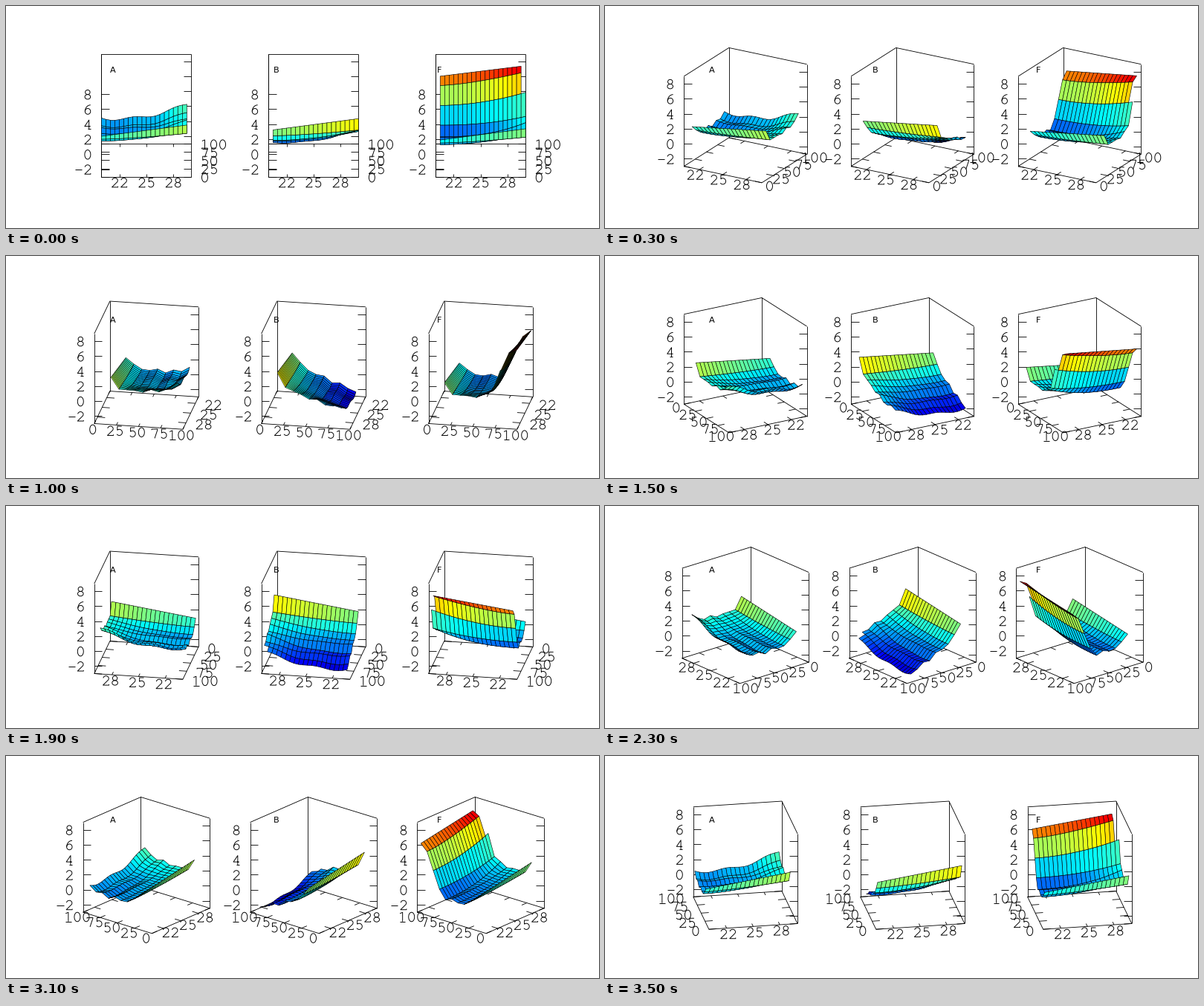
Recreate the animation shown at these times as a matplotlib script. Size 798 by 300 pixels, loop 3600 ms.

```python
import numpy as np
import matplotlib.pyplot as plt
from matplotlib.animation import FuncAnimation
from matplotlib.collections import LineCollection, PolyCollection

W, H, DPI = 798, 300, 100
FRAMES, INTERVAL = 36, 100
SIDE, CY = 121.0, 207.9          # box side and height of the base centre, px
ZPX, ZMIN, ZMAX = 10.13, -3, 9   # px per z unit and z range
SIN = 0.368                      # sine of the elevation
COS = np.sqrt(1 - SIN ** 2)
CMIN, CMAX = -3.0, 8.0
TICK, CHAR, LINE = 10.5, 12.05, 19
PX = 72 / DPI
CORNERS = np.array([(-.5, -.5), (.5, -.5), (.5, .5), (-.5, .5)])


def heights(u, k, trend, sag):
    """Height at u in 0..1 along x on row k, shared by all panels."""
    wave = np.cos(.8 * np.pi * k)
    start = .15 + 1.7 * np.exp(-1.3 * k) - .25 * wave + trend(k)
    rise = 1.05 + .08 * k + .45 * wave
    bend = 1 + 1.4 * np.sin(np.pi * k / 9)
    dip = np.sin(np.pi * u) * (k / 8) ** 3 + .4 * np.sin(4 * np.pi * u) * (k / 8) ** 2
    return start + rise * u ** bend - sag * dip


def jet(t):
    t = np.clip(t, 0, 1)[:, None]
    return np.clip(1.5 - np.abs(4 * t - np.array([3, 2, 1])), 0, 1)


def surface(trend, sag, x0, rows, cut):
    """Quads (n, 4, 3) and colours; rows from index cut on lack the last x."""
    i, k = np.meshgrid(np.arange(20), np.arange(rows), indexing="ij")
    z = heights(i / 19, k, trend, sag)
    z[-1, cut:] = np.nan
    p = np.stack([(x0 + .5 * i - 25) / 10, (18 + 9 * k - 50) / 100, z], axis=-1)
    quads = np.stack([p[:-1, :-1], p[1:, :-1], p[1:, 1:], p[:-1, 1:]], axis=2)
    quads = quads.reshape(-1, 4, 3)
    quads = quads[~np.isnan(quads).any(axis=(1, 2))]
    return quads, jet((quads[:, 0, 2] - CMIN) / (CMAX - CMIN))


def arc(cx, cy, rx, ry, a0=0, a1=360):
    a = np.radians(np.linspace(a0, a1, 25))
    return np.c_[cx + rx * np.cos(a), cy + ry * np.sin(a)]


# Thin typewriter digits as pen strokes, y up, centred on the cell.
GLYPHS = {
    "-": [[(-4.6, 0), (4.6, 0)]],
    "0": [arc(0, 0, 4, 6.3)],
    "1": [[(-3.6, 4.7), (0, 6.2), (0, -6.2)], [(-3.8, -6.2), (3.8, -6.2)]],
    "2": [np.vstack([arc(0, 2.8, 3.7, 3.5, 170, -35),
                     [(-4, -6.2), (4, -6.2), (4, -5)]])],
    "4": [[(1.8, -6.2), (1.8, 6.2), (-4, -2.4), (3.9, -2.4)],
          [(-.3, -6.2), (3.7, -6.2)]],
    "5": [np.vstack([[(3.2, 6.2), (-2.7, 6.2)],
                     arc(-.1, -2.1, 4, 4.1, 130, -145)])],
    "6": [arc(.2, -2.4, 3.7, 3.9), arc(3.9, -2.4, 7.4, 8.6, 90, 180)],
    "7": [[(-4, 5), (-4, 6.2), (3.8, 6.2), (3.8, 5.2), (0, -6.2)]],
    "8": [arc(0, 3.2, 3.2, 3.1), arc(0, -3.05, 3.8, 3.2)],
}


def write(text, x, y, align):
    """Strokes of a number; align is 0 left, 0.5 centre, 1 right."""
    x += CHAR * (.5 - align * len(text))
    return [np.array([x + i * CHAR, y]) + np.array(s) * (1, -1)
            for i, ch in enumerate(text) for s in GLYPHS[ch]]


class View:
    def __init__(self, deg):
        self.c, self.s = np.cos(np.radians(deg)), np.sin(np.radians(deg))
        self.turn = int(deg // 90)

    def corner(self, k):
        """Corners in the order left, front, right, back."""
        return CORNERS[(self.turn + k) % 4]

    def front(self, x, y):
        return x * self.s - y * self.c

    def project(self, cx, x, y, z=ZMIN):
        sx = cx + SIDE * (x * self.c + y * self.s)
        sy = CY + SIDE * SIN * self.front(x, y) - ZPX * (z - ZMIN)
        return np.stack([sx, sy], axis=-1)

    def unit(self, n):
        return np.array([n[0] * self.c + n[1] * self.s, SIN * self.front(*n)])


def edge_ticks(view, cx, outer):
    """Ticks on the base edge from an outer corner to the front and its twin."""
    a, b = view.corner(outer), view.corner(1)
    inward = view.corner(2 - outer) - b
    u = view.unit(inward)
    along_x = a[0] != b[0]
    values = (22, 25, 28) if along_x else (0, 25, 50, 75, 100)
    lines, strokes = [], []
    for v in values:
        p = np.array([(v - 25) / 10, a[1]] if along_x else [a[0], (v - 50) / 100])
        near = view.project(cx, *p)
        twin = view.project(cx, *(p + inward))
        lines += [[near, near + TICK * u], [twin, twin - TICK * u]]
        align = 0 if u[0] < -.9 else 1 if u[0] > .9 else .5
        strokes += write(str(v), near[0] - CHAR * u[0],
                         near[1] - LINE * u[1] + 1, align)
    return lines, strokes


def box(view, cx):
    base = [view.project(cx, *view.corner(k)) for k in range(4)]
    left, front, right, back = base
    up = np.array([0, -ZPX * (ZMAX - ZMIN)])
    lines = [base + [left], [left + up, back + up, right + up]]
    lines += [[p, p + up] for p in (left, back, right)]
    strokes = []
    for z in range(-2, 9, 2):
        dy = np.array([0, -ZPX * (z - ZMIN)])
        lines += [[left + dy, left + dy + (TICK, 0)],
                  [right + dy, right + dy - (TICK, 0)]]
        strokes += write(str(z), left[0] - 12.5, left[1] + dy[1] + .5, 1)
    for outer in (0, 2):
        ticks, labels = edge_ticks(view, cx, outer)
        lines += ticks
        strokes += labels
    return lines, strokes


def facets(view, cx, quads, colors):
    x, y, z = np.moveaxis(quads, -1, 0)
    depth = SIDE * COS * view.front(x, y) + z * ZPX * SIN / COS
    order = np.argsort(depth.mean(axis=1), kind="stable")
    return view.project(cx, x, y, z)[order], colors[order]


SURFACES = [
    surface(lambda k: .8 * (k / 8) ** 12, .5, 20, 9, 9),
    surface(lambda k: .85 - .39 * k, .4, 20.5, 9, 8),
    surface(lambda k: 6.3 / (1 + np.exp(-2 * (k - 6.93))) - .5, 0, 20.5, 10, 8),
]

fig = plt.figure(figsize=(W / DPI, H / DPI), dpi=DPI, facecolor="white")
ax = fig.add_axes([0, 0, 1, 1])
ax.set_xlim(-.5, W - .5)
ax.set_ylim(H - .5, -.5)
ax.axis("off")

frame_lines = LineCollection([], colors="black", linewidths=.85 * PX, zorder=1)
numbers = LineCollection([], colors="black", linewidths=.95 * PX, zorder=1)
mesh = PolyCollection([], edgecolors="black", linewidths=.6 * PX, zorder=3)
for art in (frame_lines, numbers, mesh):
    ax.add_collection(art, autolim=False)
for i, name in enumerate("ABF"):
    ax.text(139.7 + 220 * i, 90, name, family="DejaVu Sans", size=11.2 * PX,
            ha="left", va="baseline", zorder=2)


def update(i):
    view = View(i * 360 / FRAMES)
    lines, strokes, polys, colors = [], [], [], []
    for n, (quads, tint) in enumerate(SURFACES):
        cx = 188.4 + 224.9 * n
        edges, labels = box(view, cx)
        lines += edges
        strokes += labels
        p, c = facets(view, cx, quads, tint)
        polys.append(p)
        colors.append(c)
    frame_lines.set_segments(lines)
    numbers.set_segments(strokes)
    mesh.set_verts(np.concatenate(polys))
    mesh.set_facecolor(np.concatenate(colors))
    return frame_lines, numbers, mesh


anim = FuncAnimation(fig, update, frames=FRAMES, interval=INTERVAL,
                     repeat=True, repeat_delay=0, blit=False)
plt.show()
```
